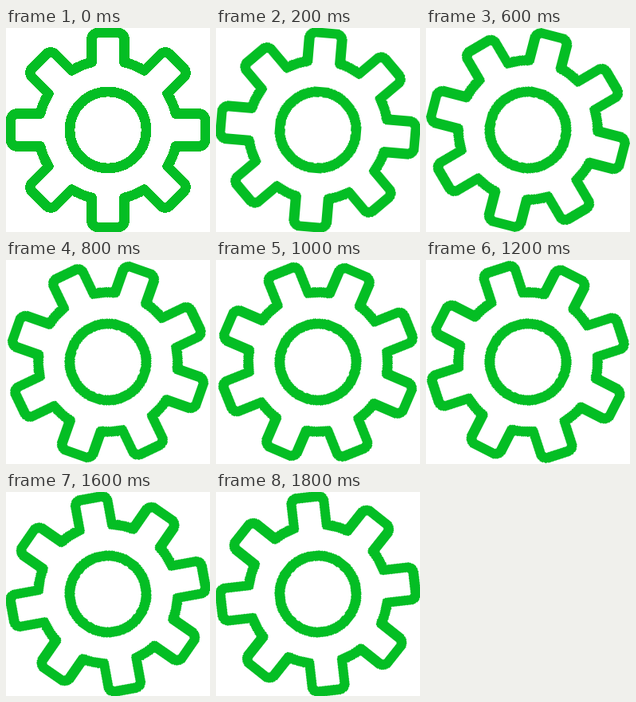
An HTML page for the animation above (2000 ms loop, 256 by 256 pixels).

```html
<!DOCTYPE html>
<html lang="en">
<head>
<meta charset="utf-8">
<title>Turning gear</title>
<style>
  html, body { margin: 0; width: 100%; height: 100%; overflow: hidden; background: #fff; }
  svg { display: block; width: 100vw; height: 100vh; }
  .gear {
    fill: none;
    stroke: #04be24;
    stroke-width: 12.6;
    stroke-linecap: round;
    stroke-linejoin: round;
    shape-rendering: crispEdges;
    animation: turn 2s infinite;
  }
  /* a quicker start, then a slower turn up to the next tooth */
  @keyframes turn {
    0% { transform: rotate(0deg); animation-timing-function: steps(4); }
    40% { transform: rotate(19.4deg); animation-timing-function: steps(6); }
    100% { transform: rotate(42.3deg); }
  }
</style>
</head>
<body>
<svg viewBox="-128 -128 256 256">
  <defs>
    <path id="tooth" d="M-20.5-85V-114a8 8 0 0 1 8-8h25a8 8 0 0 1 8 8V-85A87.4 87.4 0 0 1 45.6-74.6"/>
    <g id="pair"><use href="#tooth"/><use href="#tooth" transform="rotate(180)"/></g>
  </defs>
  <g class="gear">
    <circle r="48"/>
    <use href="#pair"/>
    <use href="#pair" transform="rotate(45)"/>
    <use href="#pair" transform="rotate(90)"/>
    <use href="#pair" transform="rotate(135)"/>
  </g>
</svg>
</body>
</html>
```
